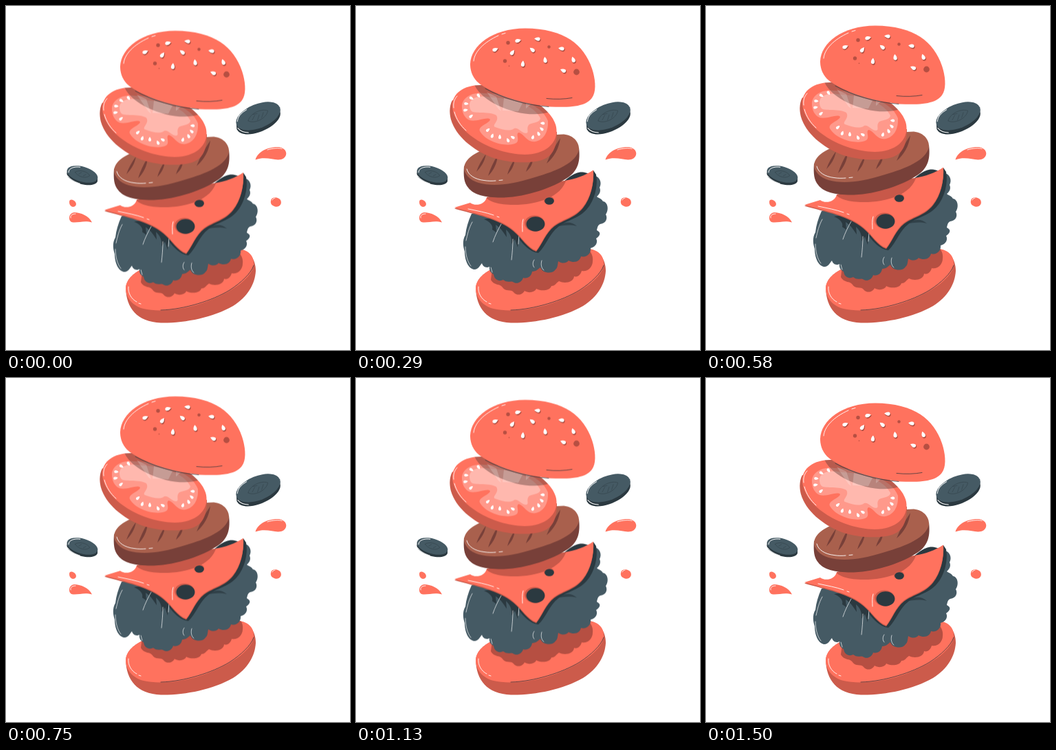
An HTML page for the animation above (1.54 s loop, 500 px wide and 500 px high).

```html
<!DOCTYPE html>
<html lang="en">
<head>
<meta charset="utf-8">
<title>Floating burger</title>
<style>
  html, body { margin: 0; width: 100%; height: 100%; overflow: hidden; background: #fff; }
  svg { display: block; width: 100vw; height: 100vh; }
  .coral { fill: #ff725e; }
  .rim { fill: #cc5b4b; }
  .leaf { fill: #455a64; }
  .dark { fill: #2b3940; }
  .shade { fill: #b64f42; }
  .white { fill: #fff; }
  .shine, .ink { fill: none; stroke: #fff; stroke-width: .9; stroke-linecap: round; }
  .ink { stroke: #263238; stroke-width: .7; }
</style>
</head>
<body>
<svg viewBox="0 0 500 500" xmlns="http://www.w3.org/2000/svg">
  <defs>
    <path id="seed" d="M0 -5.2C2 -2.8 3 -.6 2.7 1.6C2.3 4.6 -2.3 4.6 -2.7 1.6C-3 -.6 -2 -2.8 0 -5.2Z"/>
    <path id="face" d="M140 150C139 131 157 119 181 119C222 119 284 146 291 180C295 203 275 220 245 220C199 219 143 189 140 150Z"/>
    <path id="cheese" d="M143 297L166 290C172 295 187 294 190 282L303 258C318 256 334 250 345 242.500C346 262 341 282 330 296C318 311 302 313 288 323C276 332 270 350 262 359.500C249 355 242 341 229 330C208 312 174 306 143 297Z"/>
    <path id="base" d="M174 410C175 396 187 387 202 380C245 362 305 350 338 353C355 355 363 370 363 385C362 404 351 423 330 436C300 453 260 461 225 460.500C190 459 175 439 174 410Z"/>
    <clipPath id="onFace"><use href="#face"/></clipPath>
    <clipPath id="onCheese"><use href="#cheese"/></clipPath>
    <clipPath id="onBase"><use href="#base"/></clipPath>
  </defs>

  <!-- splashes -->
  <g class="coral">
    <path d="M362.500 223.500C366 210 384 204 397 205C408 207 410 216 404 221C394 228 381 217 362.500 223.500Z"/>
    <path d="M385 283C386 277 395 277 399 282C402 288 397 293 391 291.500C386 290 384 287 385 283Z"/>
    <path d="M92 285C92 280 98 281 101 285C104 290 99 293 95.500 291.500C93 290 92 288 92 285Z"/>
    <path d="M125 314.500C121 305 108 300 99 300C91 301 90 311 95 314C104 316 113 311 125 314.500Z"/>
  </g>
  <path class="shine" d="M380 209C388 206.500 397 206 401 207.500M387 282C388 280 390 279 391 279M94 308C93 304 97 302 101 302"/>

  <!-- cucumber slices -->
  <g transform="translate(366.500 160) rotate(-22)">
    <path class="dark" d="M-34 0L-36 6C-34 29 30 27 32 6L34 0Z"/>
    <ellipse class="leaf" rx="34" ry="17.500"/>
    <path class="ink" opacity=".45" d="M-16 1C-10 -8 8 -9 16 -2C10 8 -10 9 -16 1M-10 2L-4 -3M-3 5L2 -1M4 4L9 -2M-6 -5L0 -4"/>
    <path class="shine" d="M-34 5C-32 11 -27 15 -22 17M-31 -4C-28 -11 -19 -14 -12 -15"/>
  </g>
  <g transform="translate(111 244.500) rotate(16)">
    <path class="dark" d="M-23 0L-22 5C-18 18 22 17 24 4L23 0Z"/>
    <ellipse class="leaf" rx="23" ry="11"/>
    <path class="ink" opacity=".45" d="M-11 0C-6 -6 6 -6 11 -1C6 6 -6 5 -11 0M-5 1L-2 -2M2 2L5 -1"/>
    <path class="shine" d="M-20 3C-22 -3 -14 -8 -6 -9M-20 8C-14 13 -5 14 0 14"/>
  </g>

  <!-- bottom bun -->
  <use href="#base" class="rim"/>
  <path class="coral" d="M174 410C175 396 187 387 202 380C245 362 305 350 338 353C354 355 361 364 360 377C356 399 320 420 285 432C256 442 221 445 200 440C184 436 174 424 174 410Z"/>
  <path class="ink" d="M225 442C260 441 300 428 325 413C342 402 356 389 360 377"/>
  <path class="shine" d="M178 408C177 417 182 426 190 430M193 432L196 433"/>

  <g clip-path="url(#onBase)">
    <path class="shade float" d="M196 402C201 411 209 407 213 413C217 420 225 415 229 420C234 426 242 424 245 418C251 422 260 420 262 415C269 419 282 418 284 411C290 411 291 406 295 404C303 408 316 406 317 397C322 399 327 394 328 389C336 391 344 384 344 375C345 368 342 362 337 357L200 370Z"/>
  </g>

  <g class="float">
    <!-- lettuce -->
    <path class="dark" d="M295 264C307 256 314 247 326 245.500C337 245 350 252 351 264L320 300Z"/>
    <path class="leaf" d="M168 306C163 317 160 327 159 337C154 345 156 355 158 361C158 373 163 386 172 387C178 387 180 381 183 378C185 384 190 385 194 383C193 390 198 393 200 394C201 402 208 405 214 402C220 407 226 403 228 405C233 409 241 406 243 399C249 401 255 397 256 390C262 390 265 386 268 384C271 393 286 394 290 387C293 385 293 380 294 375C300 379 306 378 309 374C318 379 326 374 327 368C335 370 342 364 341 356C349 354 352 347 349 342C356 337 356 333 350 330C351 325 352 322 355 321C364 320 366 312 363 307C368 300 366 289 359 288C357 284 352 283 350 281C355 277 356 272 354 268C358 261 354 252 347 251L300 290Z"/>
    <path class="dark" d="M349 249C352 265 347 287 335 300C322 314 306 315 294 325C281 335 276 353 265 363C252 361 243 351 236 341L235 355L231 343L226 350C227 341 224 334 218 329L219 340C215 334 210 326 203 322L204 333L198 329C200 323 194 317 186 314L262 300L345 243Z"/>
    <path class="dark" opacity=".75" d="M294 324C303 317 313 317 321 324C311 321 302 323 294 324Z"/>
    <path class="shine" stroke-opacity=".75" d="M211 321C206 330 202 338 199 347M228 343C228 354 227 364 226 373M237 337L236 350M169 318C164 327 162 336 160 345M159 354C159 365 162 376 167 382M259 373C256 377 257 382 259 384M270 374C268 380 270 386 273 388M196 384L198 391"/>

    <!-- cheese -->
    <use href="#cheese" class="rim" y="1.500"/>
    <use href="#cheese" class="coral"/>
    <path class="shade" opacity=".75" clip-path="url(#onCheese)" d="M189 278C187 287 204 292 225 293C258 294 299 284 306 255L310 240H200Z"/>
    <g class="rim"><ellipse cx="259.500" cy="320" rx="14.500" ry="11.500"/><ellipse cx="280.500" cy="286.500" rx="7.500" ry="6"/></g>
    <g class="dark"><ellipse cx="261" cy="321" rx="13.500" ry="10.700"/><ellipse cx="281" cy="287.500" rx="6.800" ry="5.200"/></g>
    <path class="shine" d="M163 299C177 302 189 304 200 308M205 310L208 311M242 332C242 325 241 320 243 314"/>

    <!-- patty -->
    <path fill="#784039" d="M157 237C156 252 157 261 163 268C171 279 190 283 215 282.500C249 281 286 268 307 254C324 243 326 228 324 210Z"/>
    <path fill="#a9604d" d="M157 239C159 223 180 212 209 207C245 200 276 191 302 190.500C317 192 325 203 324 213C320 232 291 244 260 253C225 264 199 267 178 261C165 257 157 248 157 239Z"/>
    <path fill="#784039" d="M189 219C187 230 182 238 175 245C178 236 183 227 189 219ZM206 221C205 233 200 243 192 251C195 241 200 230 206 221ZM231 226C230 236 226 243 220 249C222 241 226 233 231 226ZM257 226C257 234 253 240 247 245C249 238 253 231 257 226ZM297 196C295 211 288 224 277 233C282 220 289 208 297 196Z"/>
    <path class="shine" d="M161 241C163 250 173 256 186 257.500C192 258.500 198 258.500 203 258M208 257.500L213 257"/>

    <!-- tomato -->
    <path class="rim" d="M140 141C135 150 136 162 138 169C145 193 169 213 197 224C222 233 254 233 270 228C285 223 292 211 292 187Z"/>
    <use href="#face" class="coral"/>
    <path fill="#ff998b" d="M154 151C153 138 168 128 188 131C225 131 270 146 279 171C280 188 272 199 261 201C249 203 246 192 237 188C231 189 239 199 233 203C221 210 190 203 180 186C177 178 194 175 195 169C191 164 176 173 165 170C158 167 154 159 154 151Z"/>
    <path fill="#ffb8ae" d="M165 148C165 137 180 133 197 137C230 138 259 149 268 167C268 173 259 173 252 176C246 182 253 188 247 189C239 188 236 180 230 182C224 187 213 184 202 180C197 177 209 171 204 163C195 157 174 161 168 157C166 155 165 152 165 148Z"/>
    <g id="pips" class="white"></g>
    <g clip-path="url(#onFace)">
      <path fill="#5c3d38" opacity=".43" d="M170 112C173 127 188 140 207 149C230 160 262 166 284 157L290 140L200 100Z"/>
      <path class="white" opacity=".2" d="M190 129L204 136L211 157L207 154ZM215 138L242 145L236 157L213 156ZM247 145L254 147L247 153Z"/>
    </g>
    <path class="shine" d="M142 152C141 145 143 139 147 135M143 158C146 169 152 178 160 185"/>

    <!-- top bun -->
    <path class="coral" d="M166 88C167 62 198 36.500 246 36.500C303 37 331 60 343 95C348 110 349 125 345 134C338 149 318 152 282 150.500C240 146 195 131 176 114C168 105 166 97 166 88Z"/>
    <path class="ink" d="M188 124C213 138 246 148 280 150.500M277 138.500C290 140 303 139.500 314 137.500"/>
    <path class="shine" d="M171 84C172 71 185 57 207 47M212 45L217 43.500"/>
    <g id="pores" class="shade"></g>
    <g id="seeds"></g>
  </g>
</svg>
<script>
  const NS = 'http://www.w3.org/2000/svg';
  const add = (parent, tag, attrs) => {
    const el = document.createElementNS(NS, tag);
    for (const k in attrs) el.setAttribute(k, attrs[k]);
    parent.append(el);
  };
  const seed = (parent, x, y, turn, size, fill) =>
    add(parent, 'use', { href: '#seed', fill, transform: `translate(${x} ${y}) rotate(${turn}) scale(${size})` });
  const byId = id => document.getElementById(id);

  // x, y, rotation
  const bunSeeds = [
    [202, 67.5, 65], [235, 54.5, 75], [264, 52, -85], [227, 72, 35], [256.5, 68, -50],
    [299, 66, -80], [275, 83, -8], [316, 82.5, -20], [242.5, 88.5, 5], [301.5, 98, -65]
  ];
  for (const [x, y, turn] of bunSeeds) {
    seed(byId('seeds'), x + .8, y + 1.3, turn, 1, '#a8483c');
    seed(byId('seeds'), x, y, turn, .95, '#fff');
  }

  const pips = [
    [178, 134, 145], [167.5, 138, 120], [160, 146, 95], [159, 155.5, 80], [167, 164.5, 50],
    [191.5, 184.5, 50], [198, 193, 20], [209, 194.5, 0], [221, 199.5, -25], [228, 195, -60],
    [257, 195, 15], [265.5, 190, -25], [270, 183, -50], [271.5, 174.5, -85]
  ];
  for (const [x, y, turn] of pips) seed(byId('pips'), x, y, turn, .72, '#fff');

  const pores = [[221, 57.5, 2.7], [280.5, 63.5, 2.2], [216.5, 84, 2.7], [320.5, 100, 4.4], [222.5, 91.3, .8]];
  for (const [cx, cy, r] of pores) add(byId('pores'), 'circle', { cx, cy, r });

  // Straight rise and fall of 10px with a short rest at the seam
  const loop = 1540;
  const bob = [[0, -.2], [735, -10], [1485, 0], [loop, 0]].map(([t, y]) =>
    ({ offset: t / loop, transform: `translateY(${y}px)` }));
  for (const el of document.querySelectorAll('.float'))
    el.animate(bob, { duration: loop, iterations: Infinity }).startTime = 0;
</script>
</body>
</html>
```
